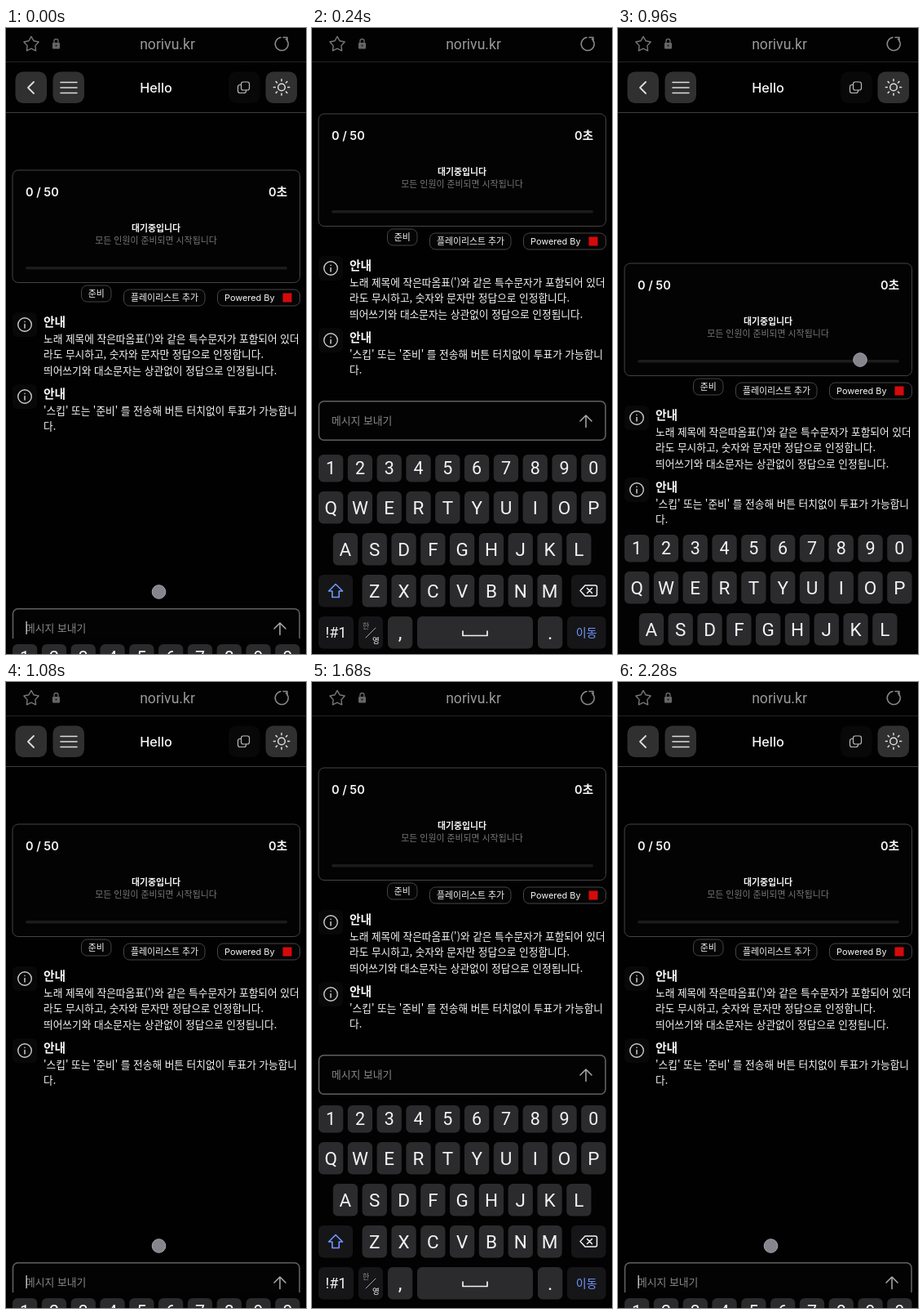
Animation, 368 px wide and 766 px high, one loop 2400 ms. Source, as an HTML page:

```html
<!DOCTYPE html>
<html lang="ko">
<head>
<meta charset="utf-8">
<style>
html, body { margin: 0; width: 100%; height: 100%; overflow: hidden; background: #000; }
svg { display: block; width: 100vw; height: 100vh; }
text { font-family: "Noto Sans CJK KR", "Noto Sans CJK", sans-serif; white-space: pre; }
.latin { font-family: Inter, "Noto Sans CJK KR", "Noto Sans CJK", sans-serif; }
.key { font-family: Roboto, "Noto Sans CJK KR", "Noto Sans CJK", sans-serif; }
</style>
</head>
<body>
<svg id="stage" viewBox="0 0 368 766"></svg>
<script>
const box = (x, y, w, h, r, fill, stroke = "none", sw = 1) =>
  `<rect x="${x}" y="${y}" width="${w}" height="${h}" rx="${r}" fill="${fill}" stroke="${stroke}" stroke-width="${sw}"/>`;
const line = (d, stroke, sw = 1.5) =>
  `<path d="${d}" fill="none" stroke="${stroke}" stroke-width="${sw}" stroke-linecap="round" stroke-linejoin="round"/>`;
const label = (str, x, y, size, { fill = "#f6f6f6", weight = 400, anchor = "start", font = "" } = {}) =>
  `<text class="${font}" x="${x}" y="${y}" font-size="${size}" font-weight="${weight}" fill="${fill}" text-anchor="${anchor}">${str}</text>`;
const group = (id, body) => `<g id="${id}">${body}</g>`;

function addressBar() {
  const star = Array.from({ length: 10 }, (_, i) => {
    const a = -Math.PI / 2 + i * Math.PI / 5, r = i % 2 ? 5.2 : 9.6;
    return `${(31 + r * Math.cos(a)).toFixed(1)} ${(20 + r * Math.sin(a)).toFixed(1)}`;
  }).join("L");
  return box(0, 0, 368, 41, 0, "#020202") +
    line(`M${star}Z`, "#777", 1.4) +
    box(57, 18, 9, 7.5, 1, "#666") + line("M59 18v-2a2.5 2.5 0 0 1 5 0v2", "#666", 1.4) +
    `<circle cx="61.5" cy="21.5" r="1" fill="#111"/>` +
    label("norivu.kr", 198, 26, 17.6, { fill: "#999", anchor: "middle", font: "key" }) +
    line("M343.5 13.5a8 8 0 1 1-6.5-1.9M340 11.5h5v5", "#8a8a8a", 1.5) +
    box(0, 41, 368, 1, 0, "#242424");
}

function header() {
  const ink = "#ddd";
  const button = (x, fill = "#303030") => box(x, 53.5, 38.5, 38.5, 9.5, fill);
  const rays = Array.from({ length: 8 }, (_, i) =>
    `<path d="M0-7.7v-2" transform="translate(338 72.5) rotate(${i * 45})" stroke="${ink}" stroke-width="1.5" stroke-linecap="round"/>`).join("");
  return button(11.5) + line("M34 66l-7 7 7 7", ink, 1.8) +
    button(57.5) + line("M67 66.5h20M67 73h20M67 79.5h20", ink, 1.6) +
    label("Hello", 184, 78.5, 16.2, { weight: 500, anchor: "middle", font: "latin" }) +
    button(273, "#080808") +
    box(288.5, 66, 10, 10, 2.5, "none", "#bbb", 1.2) +
    line("M288.5 69.500h-1.500a2.500 2.500 0 0 0-2.500 2.500v5a2.500 2.500 0 0 0 2.500 2.500h5a2.500 2.500 0 0 0 2.500-2.500v-1", "#bbb", 1.2) +
    button(318.5) +
    `<circle cx="338" cy="72.5" r="4.3" fill="none" stroke="${ink}" stroke-width="1.5"/>` + rays +
    box(0, 103, 368, 1, 0, "#3c3c3c");
}

function notice(y, lines) {
  return box(8, y, 30, 30, 6, "#080808") +
    `<circle cx="23" cy="${y + 15}" r="8.3" fill="none" stroke="#ccc" stroke-width="1.4"/>` +
    line(`M23 ${y + 14.5}v4.5M23 ${y + 11.3}v.1`, "#ccc", 1.5) +
    label("안내", 46, y + 16.5, 14.8, { weight: 700 }) +
    lines.map((s, i) => label(s, 46, y + 37 + i * 19.3, 12.7)).join("");
}

// Coordinates are relative to the top of the score card.
function content() {
  const edge = "#444", mid = { anchor: "middle" };
  return box(8, 0, 352.5, 137.5, 7, "#030303", edge) +
    label("0 / 50", 24, 32.3, 14.5, { weight: 600, font: "latin" }) +
    label("0초", 345, 32.3, 14.5, { weight: 600, anchor: "end", font: "latin" }) +
    label("대기중입니다", 184, 74.5, 10.9, { ...mid, weight: 700 }) +
    label("모든 인원이 준비되면 시작됩니다", 184, 89.7, 10.9, { ...mid, fill: "#777" }) +
    box(24, 118, 321, 3.6, 1.8, "#1c1c1c") +
    box(92.5, 141, 36.5, 20, 7, "#050505", edge) + label("준비", 110.8, 155, 10.9, mid) +
    box(144.5, 146, 99.5, 20, 7, "#050505", edge) + label("플레이리스트 추가", 194.5, 160, 10.9, mid) +
    box(259.5, 146, 101, 20, 7, "#050505", edge) +
    label("Powered By", 268, 160, 10.9, { font: "latin" }) +
    box(339.5, 150.5, 11, 11, 0, "#d60a0a") +
    notice(174, [
      "노래 제목에 작은따옴표(')와 같은 특수문자가 포함되어 있더",
      "라도 무시하고, 숫자와 문자만 정답으로 인정합니다.",
      "띄어쓰기와 대소문자는 상관없이 정답으로 인정됩니다."]) +
    notice(262, ["'스킵' 또는 '준비' 를 전송해 버튼 터치없이 투표가 가능합니", "다."]);
}

function messageField() {
  return box(8.5, 0.8, 351.5, 47.5, 6, "#030303", "#606060", 1.6) +
    label("메시지 보내기", 24, 29, 12.8, { fill: "#888" }) +
    line("M336 32.5v-14.5M329 25l7-7 7 7", "#aaa", 1.5) +
    `<rect id="caret" x="24.5" y="16" width="1.2" height="16" fill="#ddd"/>`;
}

// Coordinates are relative to the top of the digit row.
function keyboard() {
  const plain = "#2b2b2d", dark = "#161618", pitch = 35.8;
  const key = (str, x, y, w, h, fill, size, ink = "#f2f2f2") =>
    box(x, y, w, h, 6, fill) +
    label(str, x + w / 2, y + h / 2 + size * 0.36, size, { fill: ink, anchor: "middle", font: "key" });
  const row = (chars, x, y, h, size) =>
    [...chars].map((c, i) => key(c, x + i * pitch, y, 30.3, h, plain, size)).join("");
  return box(0, -7, 368, 300, 0, "#020202") +
    row("1234567890", 8, 0, 33.5, 21.5) +
    row("QWERTYUIOP", 8, 45, 39.5, 22.5) +
    row("ASDFGHJKL", 25.8, 96, 39.5, 22.5) +
    row("ZXCVBNM", 61.6, 147, 39.5, 22.5) +
    box(8, 147, 42, 39.5, 6, dark) +
    line("M29 158.5l8.5 8.5h-4.3v7.5h-8.4V167h-4.3z", "#6f97ff", 1.6) +
    box(318, 147, 42.5, 39.5, 6, dark) +
    line("M335 160h12.5a2 2 0 0 1 2 2v9a2 2 0 0 1-2 2H335l-6-6.5zM337.5 163.5l6 6M343.5 163.5l-6 6", "#f2f2f2", 1.5) +
    key("!#1", 8, 198, 43, 39.5, dark, 18) +
    box(57, 198, 30, 39.5, 6, dark) +
    label("한", 62, 212.5, 9, { fill: "#888" }) + label("영", 74, 231, 9.5) +
    line("M66 224l12-12", "#aaa", 1) +
    key(",", 93, 198, 30.3, 39.5, plain, 24) +
    box(129, 198, 142, 39.5, 6, plain) +
    line("M185 216v5.5h30V216", "#f2f2f2", 1.7) +
    key(".", 277, 198, 30.3, 39.5, plain, 24) +
    key("이동", 313, 198, 47.5, 39.5, dark, 14, "#6f97ff");
}

document.getElementById("stage").innerHTML =
  box(0, 0, 368, 766, 0, "#010101") +
  group("content", content()) + group("field", messageField()) + group("header", header()) +
  group("keyboard", keyboard()) + addressBar() +
  `<circle id="touch" r="8.3" fill="#85858b" stroke="#a5a5b5" stroke-width="1"/>`;

const part = id => document.getElementById(id);
const moveTo = (id, x, y) => part(id).setAttribute("transform", `translate(${x} ${y})`);
const show = (id, on) => part(id).setAttribute("visibility", on ? "visible" : "hidden");

const opening = { card: 174, field: 710, keys: 754, header: true, touch: [187.5, 690] };
const rising = { card: 105, field: 456, keys: 522 };
const open = { ...rising, keys: 518 };
const closing = { card: 288, field: 710, keys: 620, header: true, touch: [297, 406] };
const STEP = 120;
const poses = [opening, rising, rising, rising, open, open, closing, closing, closing, opening];

// The poses play forwards, then backwards.
function draw(time) {
  const step = Math.floor(time / STEP) % (2 * poses.length);
  const pose = poses[Math.min(step, 2 * poses.length - 1 - step)];
  moveTo("content", 0, pose.card);
  moveTo("field", 0, pose.field);
  moveTo("keyboard", 0, pose.keys);
  show("header", pose.header);
  show("caret", pose === opening);
  show("touch", pose.touch);
  if (pose.touch) moveTo("touch", ...pose.touch);
}

const start = performance.now();
function tick() {
  draw(performance.now() - start);
  requestAnimationFrame(tick);
}
tick();
</script>
</body>
</html>
```
